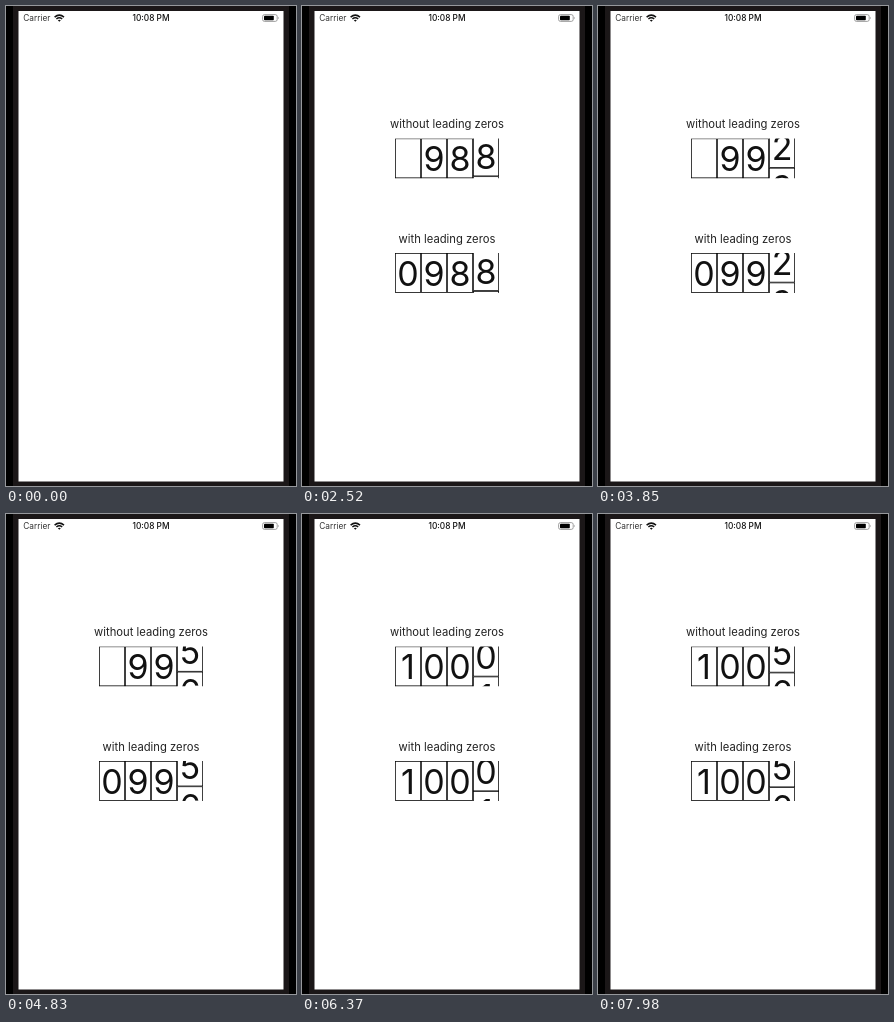
Recreate the animation shown at these times as an HTML page. Size 290 by 480 pixels, loop 8 s.

```html
<!DOCTYPE html>
<html lang="en">
<head>
<meta charset="utf-8">
<title>Rolling counters</title>
<style>
  html, body { margin: 0; width: 100%; height: 100%; overflow: hidden; background: #000; }
  svg { display: block; }
  text { font-family: Inter, Roboto, sans-serif; fill: #111; text-anchor: middle; }
  .status { font-size: 8.3px; }
  .label { font-size: 11.25px; fill: #222; }
  .digit { font-size: 34px; }
  .cell { fill: #fff; stroke: #000; stroke-width: .75; }
</style>
</head>
<body>
<svg id="stage" width="290" height="480" viewBox="0 0 290 480">
  <rect x="7" width="276" height="480" fill="#1b1718"/>
  <rect x="12.5" y="5" width="265" height="470.5" fill="#fff"/>

  <text class="status" x="17.3" y="15.4" style="text-anchor:start;fill:#333">Carrier</text>
  <text class="status" x="145" y="15.4" font-weight="500">10:08 PM</text>
  <g fill="none" stroke="#111" stroke-width="1.5">
    <path d="M48.6 11.1Q53.3 7.1 58 11.1M50.4 13Q53.3 10.5 56.2 13"/>
    <path d="M51.8 14.2Q53.3 13.2 54.8 14.2L53.3 15.8Z" fill="#111" stroke="none"/>
  </g>
  <rect x="256.6" y="8.6" width="14.6" height="6.8" rx="1.9" fill="none" stroke="#888" stroke-width=".8"/>
  <rect x="258" y="9.8" width="9.8" height="4.4" rx=".8" fill="#000"/>
  <path d="M272.1 10.7Q273.6 12 272.1 13.3Z" fill="#888"/>

  <g id="counters">
    <text class="label" x="145" y="122">without leading zeros</text>
    <text class="label" x="145" y="236.5">with leading zeros</text>
  </g>
</svg>
<script>
const LOOP = 8000, APPEAR = 980, TICK = 70;
const START_VALUE = 983.17, MS_PER_UNIT = 315.7;
const CELL_W = 26, CELL_H = 39.8, LEFT = 93, PLACES = 4;
const counters = document.getElementById('counters');

function add(parent, tag, attrs) {
  const node = document.createElementNS('http://www.w3.org/2000/svg', tag);
  for (const name in attrs) node.setAttribute(name, attrs[name]);
  return parent.appendChild(node);
}

// A column is a clipped window over two stacked cells.
function makeColumn(top, index, leadingZeros) {
  const view = add(counters, 'svg', {
    x: LEFT + index * CELL_W, y: top, width: CELL_W, height: CELL_H, overflow: 'hidden'
  });
  const strip = add(view, 'g', {});
  const digits = [0, 1].map(row => {
    const y = row * CELL_H;
    add(strip, 'rect', { class: 'cell', x: .375, y: y + .375, width: CELL_W - .75, height: CELL_H - .75 });
    return add(strip, 'text', { class: 'digit', x: CELL_W / 2, y: y + 32.4 });
  });
  return { strip, digits, unit: 10 ** (PLACES - 1 - index), leadingZeros };
}

const columns = [[132.4, false], [247.1, true]].flatMap(([top, zeros]) =>
  Array.from({ length: PLACES }, (_, i) => makeColumn(top, i, zeros)));

function digitAt(number, { unit, leadingZeros }) {
  return number < unit && !leadingZeros ? '' : String(Math.floor(number / unit) % 10);
}

function draw(time) {
  counters.style.display = time < APPEAR ? 'none' : '';
  const elapsed = Math.floor((time - APPEAR) / TICK) * TICK;
  const value = START_VALUE + elapsed / MS_PER_UNIT;
  const whole = Math.floor(value);
  for (const column of columns) {
    const pair = [digitAt(whole, column), digitAt(whole + 1, column)];
    column.digits.forEach((node, i) => { node.textContent = pair[i]; });
    const shift = pair[0] === pair[1] ? 0 : (value - whole) * CELL_H;
    column.strip.setAttribute('transform', `translate(0 ${-shift})`);
  }
}

const origin = performance.now();
function frame() {
  draw((performance.now() - origin) % LOOP);
  requestAnimationFrame(frame);
}
frame();
</script>
</body>
</html>
```
